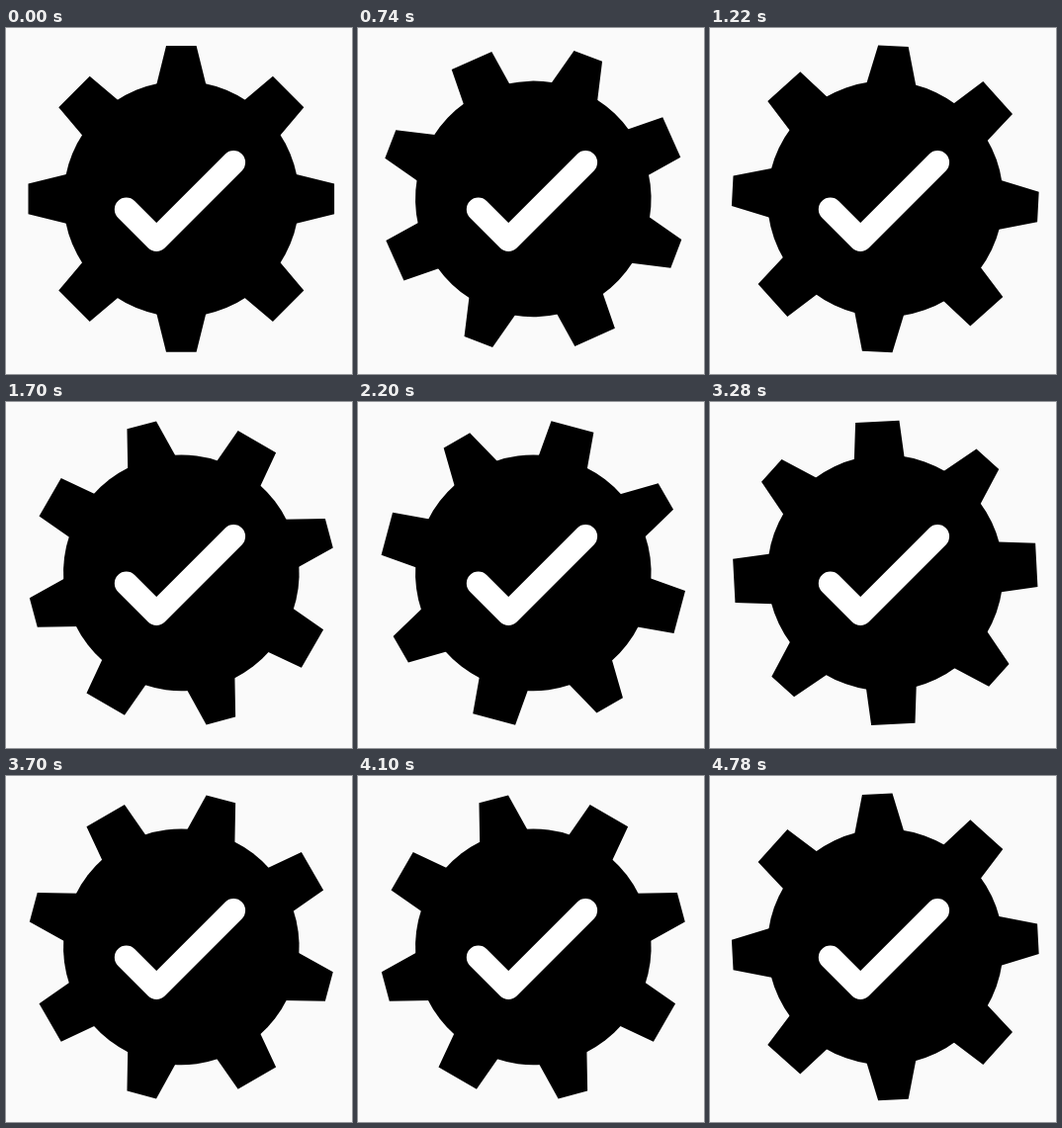
Animation of 350x350 px, one loop 4.8 s. Source, as an HTML page:

```html
<!DOCTYPE html>
<html lang="en">
<head>
<meta charset="utf-8">
<title>Gear check</title>
<style>
  html, body { margin: 0; width: 100%; height: 100%; overflow: hidden; background: #fafafa; }
  svg { display: block; width: 100vw; height: 100vh; }
</style>
</head>
<body>
<svg viewBox="0 0 350 350">
  <g id="gear">
    <circle r="119.3"/>
    <path id="teeth"/>
  </g>
  <path d="M121.7 183.5L152.2 214L230.2 136" fill="none" stroke="#fff"
        stroke-width="23.8" stroke-linecap="round" stroke-linejoin="round"/>
</svg>
<script>
  const LOOP = 4800, STEP = 20, DEG_PER_STEP = 3;
  const CENTER = '177.3 172.9';
  const ROOT = 100;
  const gear = document.getElementById('gear');

  // Tooth profile: half width and radius at the tip, half width at radius 117.
  const narrow = { tip: 15.3, reach: 154.8, base: 24.7 };
  const wide = { tip: 22.2, reach: 153.2, base: 25.3 };

  function tooth({ tip, reach, base }, deg) {
    const a = deg * Math.PI / 180, c = Math.cos(a), s = Math.sin(a);
    const root = base + (base - tip) * (117 - ROOT) / (reach - 117);
    const corners = [[-root, -ROOT], [-tip, -reach], [tip, -reach], [root, -ROOT]];
    const points = corners.map(([x, y]) =>
      (x * c - y * s).toFixed(2) + ' ' + (x * s + y * c).toFixed(2));
    return 'M' + points.join('L') + 'Z';
  }

  let d = '';
  for (let i = 0; i < 8; i++) d += tooth(i % 2 ? wide : narrow, i * 45);
  document.getElementById('teeth').setAttribute('d', d);

  function draw(ms) {
    const angle = Math.floor((ms % LOOP) / STEP) * DEG_PER_STEP;
    gear.setAttribute('transform', `translate(${CENTER}) rotate(${angle})`);
  }

  const start = performance.now();
  function tick() {
    draw(performance.now() - start);
    requestAnimationFrame(tick);
  }
  draw(0);
  requestAnimationFrame(tick);
</script>
</body>
</html>
```
